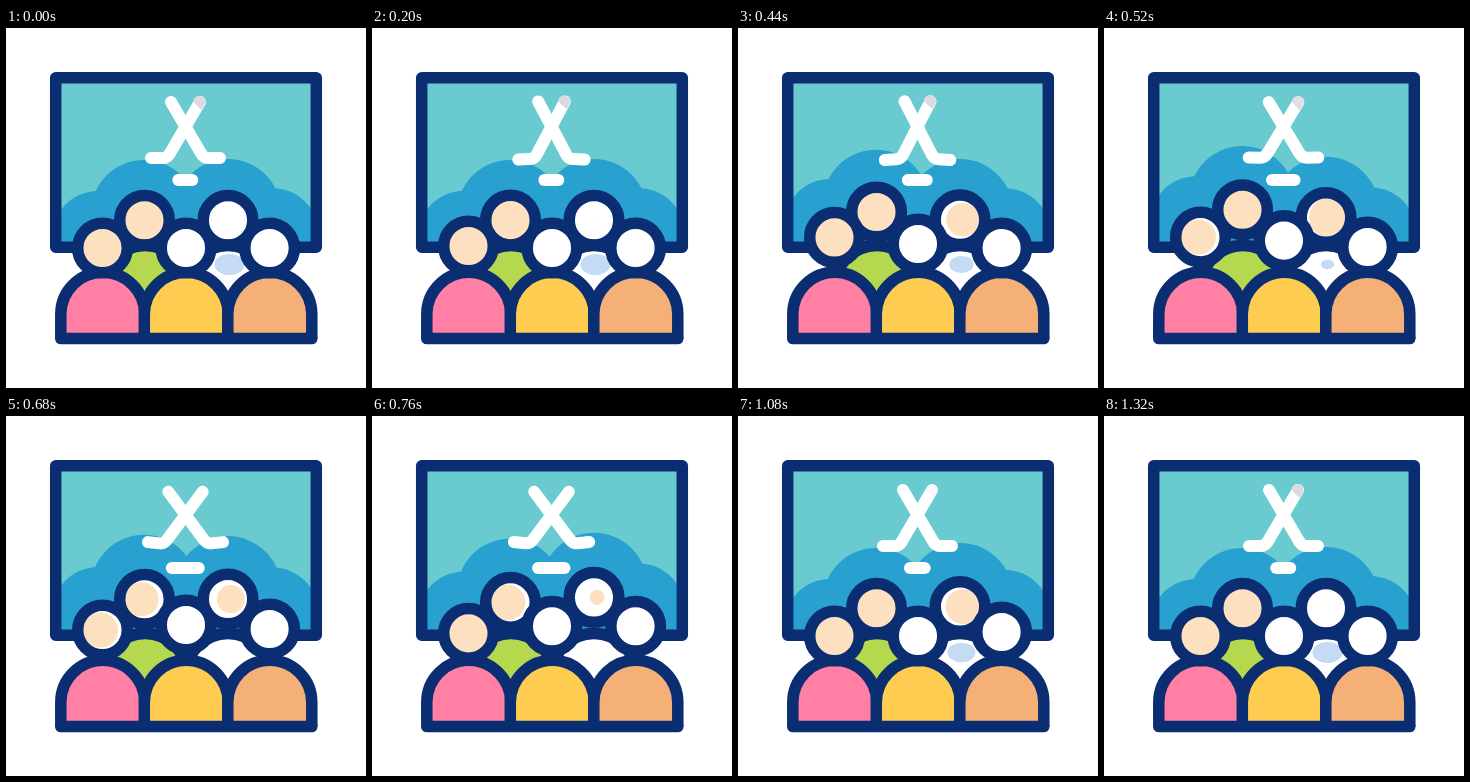
Recreate the animation shown at these times as an HTML page. Size 360 px wide and 360 px high, loop 1640 ms.

```html
<!DOCTYPE html>
<html lang="en">
<head>
<meta charset="utf-8">
<title>Hockey fans</title>
<style>
  html, body { margin: 0; width: 100%; height: 100%; overflow: hidden; background: #fff; }
  svg { display: block; width: 100vw; height: 100vh; }
  .line { stroke: #0b2d72; stroke-width: 11.5; stroke-linejoin: round; }
  .stick { fill: none; stroke: #fff; stroke-width: 12; stroke-linecap: round; stroke-linejoin: round; }
</style>
</head>
<body>
<svg id="stage" viewBox="0 0 360 360">
  <defs>
    <clipPath id="view"><rect x="50" y="50" width="260" height="169"/></clipPath>
    <clipPath id="face"><circle r="22"/></clipPath>
  </defs>
  <rect x="50" y="50" width="260" height="169" fill="#69cbd0"/>
  <g id="clouds" fill="#28a1d0" clip-path="url(#view)"></g>
  <rect class="line" x="49.7" y="49.7" width="260.6" height="169.6" fill="none"/>
  <g id="sticks"></g>
  <path id="puck" class="stick"/>
  <g id="back"></g>
  <g id="front"></g>
</svg>
<script>
const LOOP = 1640, STEP = 40, LAST = 1320;
const $ = id => document.getElementById(id);

function add(parent, tag, attrs = {}) {
  const el = document.createElementNS('http://www.w3.org/2000/svg', tag);
  set(el, attrs);
  parent.appendChild(el);
  return el;
}

function set(el, attrs) {
  for (const k in attrs) el.setAttribute(k, attrs[k]);
}

// Smooth rise and fall between 0 and 1, centred on peak
function bump(t, peak, half = 400) {
  const d = Math.abs(t - peak);
  return d < half ? (1 + Math.cos(Math.PI * d / half)) / 2 : 0;
}

// Hides something around the given time
const fade = (t, peak, force) => Math.max(0, 1 - force * bump(t, peak));

function cloud(x, top, r, peak) {
  const el = add($('clouds'), 'path', {
    d: `M${x - r} ${top + r}a${r} ${r} 0 0 1 ${2 * r} 0v80h${-2 * r}z`
  });
  return { el, peak };
}

function body(parent, x, top, bottom, fill) {
  add(parent, 'path', {
    class: 'line', fill,
    d: `M${x - 42} ${bottom}V${top + 42}a42 42 0 0 1 84 0V${bottom}`
  });
}

// skin(t) gives the radius of the tinted part of the face
function head(parent, x, y, peak, skin, shift) {
  const el = add(parent, 'g');
  add(el, 'circle', { r: 22, fill: '#fff' });
  const patch = skin && add(add(el, 'g', { 'clip-path': 'url(#face)' }), 'circle', { cx: shift, fill: '#fce0bf' });
  add(el, 'circle', { class: 'line', r: 24.8, fill: 'none' });
  return { el, x, y, peak, skin, patch };
}

const clouds = [
  cloud(92, 163, 46, 560),
  cloud(266, 160, 47, 860),
  cloud(138, 132, 53, 590),
  cloud(222, 131, 53, 820)
];

const sticks = [1, -1].map(side => {
  const flip = add($('sticks'), 'g', { transform: `translate(179.5 100) scale(${side} 1)` });
  const el = add(flip, 'g');
  add(el, 'path', { class: 'stick', d: 'M-14.5 -26L16 26Q18.5 30 23 30H34.5' });
  return el;
});
const tip = add(sticks[1], 'path', { d: 'M-14 -32a6 6 0 0 0-6 7l4 7 8-8q0-6-6-6z', fill: '#dcdae0' });

const back = $('back'), front = $('front');
const heads = [
  head(back, 138.5, 192.3, 570, t => 26 - 9 * bump(t, 700, 300), -3),
  head(back, 222, 192.3, 785, t => 20 * bump(t, 540, 380) + 18 * bump(t, 1100, 180), 3)
];
body(back, 139, 217.5, 275, '#b4d94f');
body(back, 222, 217.5, 275, '#fff');
const shirt = add(back, 'ellipse', { cx: 223.5, cy: 236.5, fill: '#c5daf4' });

['#ff7fa5', '#fecc51', '#f5b077'].forEach((fill, i) => body(front, 96.8 + 83.5 * i, 244.3, 310.6, fill));
add(front, 'path', { class: 'line', d: 'M54.8 310.6H305.8', 'stroke-linecap': 'round' });
heads.push(
  head(front, 96.5, 220, 490, t => 26 - 11 * bump(t, 600, 250), -2),
  head(front, 180, 220, 675),
  head(front, 263.6, 220, 845)
);

function draw(t) {
  for (const c of clouds) {
    set(c.el, { transform: `translate(0 ${-15 * bump(t, c.peak)})` });
  }
  for (const h of heads) {
    set(h.el, { transform: `translate(${h.x} ${h.y - 11 * bump(t, h.peak)})` });
    if (h.patch) set(h.patch, { r: h.skin(t) });
  }

  const angle = 5 * bump(t, 340, 280) - 6.5 * bump(t, 730, 340);
  for (const s of sticks) set(s, { transform: `rotate(${angle})` });
  set(tip, { opacity: fade(t, 860, 2) });

  const half = 7 + 6.5 * bump(t, 700, 450);
  set($('puck'), { d: `M${179.3 - half} 152H${179.3 + half}` });

  const size = fade(t, 740, 1.3);
  set(shirt, { rx: 15 * size, ry: 10.5 * size });
}

const start = performance.now();
function tick() {
  const t = (performance.now() - start) % LOOP;
  draw(t < 2 * STEP ? 0 : Math.min(LAST, Math.floor(t / STEP) * STEP));
  requestAnimationFrame(tick);
}
draw(0);
requestAnimationFrame(tick);
</script>
</body>
</html>
```
